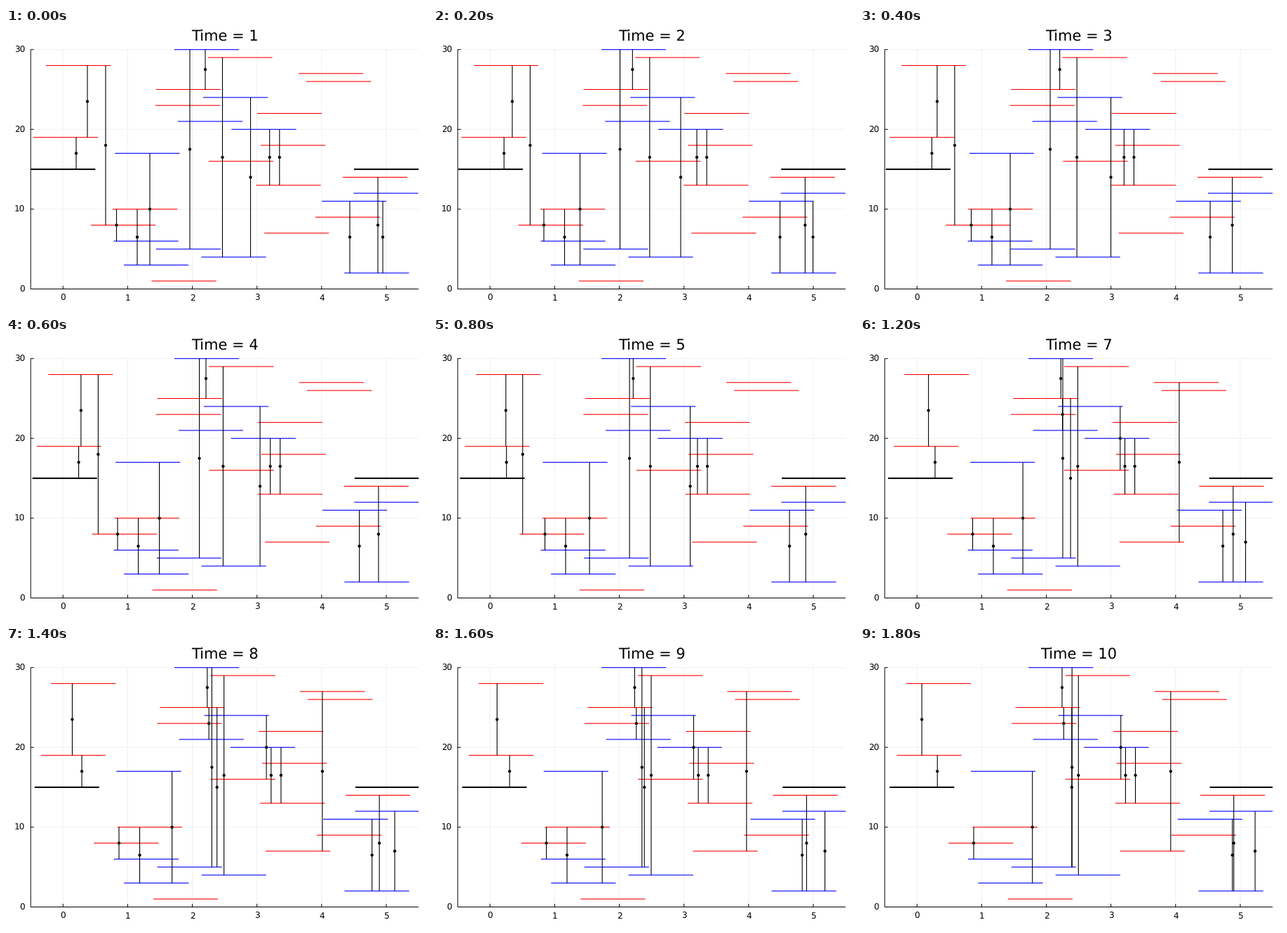
Write a matplotlib script that moves like this. It is 600x400 px and loops after 2000 ms.

```python
import numpy as np
import matplotlib.pyplot as plt
from matplotlib.animation import FuncAnimation
from matplotlib.collections import LineCollection

plt.rcParams["font.family"] = "DejaVu Sans"
plt.rcParams["text.hinting"] = "none"
plt.rcParams["path.snap"] = False

W, H, DPI = 600, 400, 100
PX = 72 / DPI                      # one pixel in points
LEFT, RIGHT, TOP, BOTTOM = 35.2, 588.0, 30.7, 371.5
UNIT_X = (RIGHT - LEFT) / 6
UNIT_Y = (BOTTOM - TOP) / 30
STEPS = 10

# Filaments are one unit long; level: left end in pixels at the first step
RED = {28: 57, 19: 39, 8: 121.2, 10: 152, 25: 214, 23: 213, 1: 207.5,
       29: 287.5, 16: 288.8, 22: 358, 13: 356.5, 18: 363, 7: 368, 9: 441,
       27: 417, 26: 428, 14: 480}
BLUE = {30: 239.8, 21: 245, 5: 214, 17: 155.3, 6: 153.5, 3: 168, 24: 281,
        4: 278.4, 20: 321.4, 11: 450, 12: 495.4, 2: 482.2}

# Motors join two levels: low, high, x in pixels when they bind
BIND = {
    0: [(15, 19, 100), (19, 28, 116), (8, 28, 142), (6, 10, 157.5),
        (3, 10, 187), (3, 17, 205), (5, 30, 262), (25, 30, 284),
        (4, 29, 308.5), (4, 24, 348.5), (13, 20, 375.7), (13, 20, 389.8),
        (2, 11, 490), (2, 14, 530), (2, 11, 537)],
    5: [(5, 25, 299.5), (21, 25, 288), (16, 24, 370.5), (7, 27, 459),
        (2, 12, 545)],
}
RELEASE = {9: (3, 10)}

# Speeds in pixels per step
FLOW = 0.3       # common drift of all filaments
DRAG = 0.26      # push of one motor between opposite filaments
WALK = 4.35      # motor along its filament
# colour: (walking direction, pull of the left wall, line width)
KINDS = {"red": (-1, 1.1, 1.1), "blue": (1, 0, 1.1), "black": (1, 0.78, 2)}


def px(v):
    return LEFT + (v + 0.5) * UNIT_X


def py(v):
    return BOTTOM - v * UNIT_Y


filaments = [(15, px(-0.5), "black"), (15, px(4.5), "black")]
filaments += [(level, x, "red") for level, x in RED.items()]
filaments += [(level, x, "blue") for level, x in BLUE.items()]
levels, starts, colors = zip(*filaments)
sign = np.array([KINDS[c][0] for c in colors])
pull = np.array([KINDS[c][1] for c in colors])


def simulate():
    """Return filament and motor positions for every step."""
    x, motors, history = np.array(starts), [], []
    for t in range(STEPS):
        motors += [(levels.index(lo), levels.index(hi), m)
                   for lo, hi, m in BIND.get(t, [])]
        # a motor falls off when it walks past the end of a filament
        motors = [(i, j, m) for i, j, m in motors
                  if max(x[i], x[j]) <= m <= min(x[i], x[j]) + UNIT_X
                  and (levels[i], levels[j]) != RELEASE.get(t)]
        history.append((x, motors))
        v = FLOW + pull * np.exp((LEFT - x) / 60)
        for i, j, _ in motors:
            if sign[i] != sign[j]:
                v[[i, j]] -= DRAG * sign[[i, j]]
        motors = [(i, j, m + (v[i] + v[j] + WALK * (sign[i] + sign[j])) / 2)
                  for i, j, m in motors]
        x = x + v
    return history


history = simulate()

fig = plt.figure(figsize=(W / DPI, H / DPI), dpi=DPI, facecolor="white")
ax = fig.add_axes([0, 0, 1, 1])
ax.set_xlim(0, W)
ax.set_ylim(H, 0)
ax.axis("off")


def lines(segments, color, width, z, cap="butt"):
    group = LineCollection(segments, colors=color, linewidths=width * PX,
                           zorder=z, capstyle=cap)
    group.set_snap(False)
    return ax.add_collection(group, autolim=False)


def label(x, y, s, size, ha="center"):
    return ax.text(x, y, s, fontsize=size * PX, ha=ha, va="baseline")


xs = [px(v) for v in range(6)]
ys = [py(v) for v in range(0, 31, 10)]
grid = [[(x, TOP), (x, BOTTOM)] for x in xs]
grid += [[(LEFT, y), (RIGHT, y)] for y in ys]
axes = [[(LEFT, TOP), (LEFT, BOTTOM)], [(LEFT, BOTTOM), (RIGHT, BOTTOM)]]
axes += [[(x, BOTTOM - 4.5), (x, BOTTOM)] for x in xs]
axes += [[(LEFT, y), (LEFT + 4.5, y)] for y in ys]
lines(grid, "#f1f1f1", 1, 0)
lines(axes, "black", 1, 1)
for v, x in enumerate(xs):
    label(x, 388, str(v), 12)
for v, y in enumerate(ys):
    label(27, y + 4.4, str(10 * v), 12, "right")
title = label(312, 18.4, "", 21)

groups = {c: lines([], c, kind[2], 2) for c, kind in KINDS.items()}
rods = lines([], "black", 1.1, 3)
dots = lines([], "black", 4.4, 4, "round")


def bar(level, x):
    lo, hi = np.clip([x, x + UNIT_X], LEFT, RIGHT)
    return [(lo, py(level)), (hi, py(level))]


def draw(t):
    x, motors = history[t]
    title.set_text(f"Time = {t + 1}")
    for color, group in groups.items():
        group.set_segments([bar(level, left) for level, left, c
                            in zip(levels, x, colors) if c == color])
    spans = [(m, py(levels[i]), py(levels[j])) for i, j, m in motors]
    rods.set_segments([[(m, a), (m, b)] for m, a, b in spans])
    dots.set_segments([[(m, (a + b) / 2), (m + 0.01, (a + b) / 2)]
                       for m, a, b in spans])


anim = FuncAnimation(fig, draw, frames=STEPS, interval=200, repeat=True,
                     repeat_delay=0)
plt.show()
```
